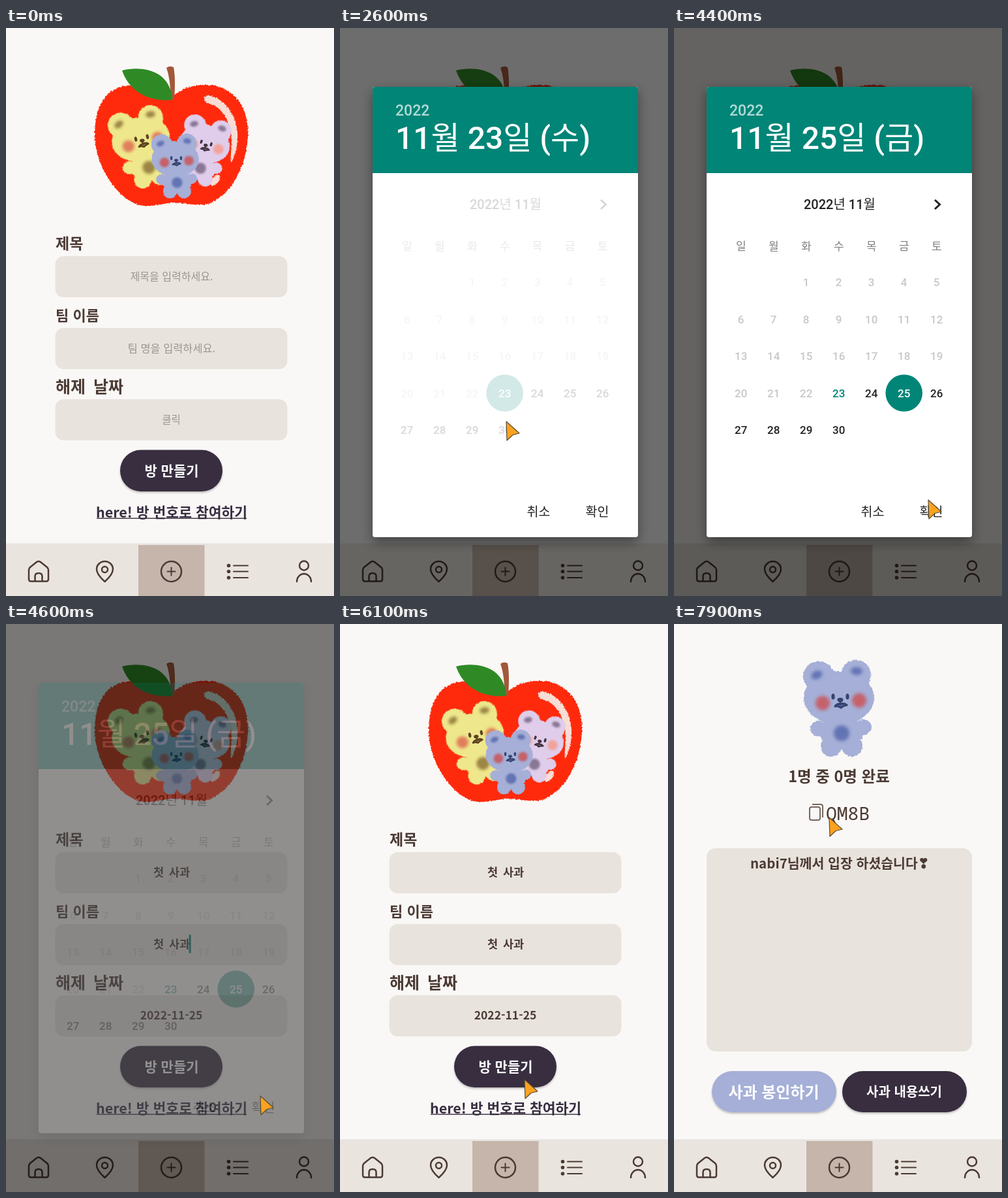
These frames come from a looping animation (503 px wide and 869 px high, 8 s). An HTML page:

```html
<!DOCTYPE html>
<html lang="ko">
<head>
<meta charset="utf-8">
<style>
html, body { margin: 0; height: 100%; overflow: hidden; background: #faf8f6; }
svg { display: block; width: 100vw; height: 100vh; }
text { text-anchor: middle; white-space: pre; font-family: "Noto Sans CJK KR", "Noto Sans CJK", "Noto Sans CJK JP", sans-serif; }
.start { text-anchor: start; }
.b { font-weight: 700; }
.m { font-weight: 500; }
.cal text { font-family: Roboto, "Noto Sans CJK KR", "Noto Sans CJK", "Noto Sans CJK JP", sans-serif; }
.mono { font-family: "Noto Sans Mono", monospace; }
</style>
</head>
<body>
<script>
const INK = '#4b3a34', FIELD = '#e9e3dd', DARK = '#382e41', TEAL = '#008577', HINT = '#9b9591', BLUE = '#a5afd7';

const rect = (x, y, w, h, r, fill, more = '') =>
  `<rect x="${x}" y="${y}" width="${w}" height="${h}" rx="${r}" fill="${fill}" ${more}/>`;
const oval = (x, y, rx, ry, fill = '', turn = 0) =>
  `<ellipse rx="${rx}" ry="${ry}" transform="translate(${x} ${y}) rotate(${turn})" ${fill && `fill="${fill}"`}/>`;
const path = (d, fill, more = '') => `<path d="${d}" fill="${fill}" ${more}/>`;
// y is the visual middle of the line
const text = (x, y, str, size, fill, more = '') =>
  `<text x="${x}" y="${y + size * .36}" font-size="${size}" fill="${fill}" ${more}>${str}</text>`;
const bold = 'class="b"', medium = 'class="m"', label = 'class="b start"';

// Bear around its nose
const bear = (x, y, scale, turn, coat, spot, cheek, face) => `
  <g transform="translate(${x} ${y}) rotate(${turn}) scale(${scale})">
    <g fill="${coat}" filter="url(#rough)">
      ${oval(-33, -37, 24, 23)}${oval(24, -39, 23, 23)}${oval(-2, -4, 54, 41)}
      ${oval(2, 49, 33, 26)}${oval(-33, 43, 13, 12)}${oval(35, 41, 13, 12)}
      ${oval(-14, 70, 16, 16)}${oval(18, 70, 16, 16)}
    </g>
    <g filter="url(#soft)">
      ${oval(-36, -39, 9, 6, spot, -25)}${oval(25, -45, 9, 6, spot, 5)}${oval(2, 50, 12, 12, spot)}
      ${oval(-27, 4, 11, 11, cheek)}${oval(29, 0, 11, 11, cheek)}
    </g>
    ${oval(-11, -6, 2.6, 4.6, face)}${oval(11, -6, 2.6, 4.6, face)}${oval(0, -1, 4.5, 3.2, face)}
    ${path('M0 0V5M-8 9Q-4 4 0 6Q5 3 10 7Q4 8 1 11Q-3 8 -8 9Z', spot, `stroke="${face}" stroke-width="3.2" stroke-linejoin="round"`)}
  </g>`;
const blueBear = (x, y, scale) => bear(x, y, scale, 0, BLUE, '#6374b4', '#c4626c', '#35436f');

const apple = `
  <g filter="url(#rough)">
    ${path('M254 106C235 88 205 86 185 88C150 92 136 125 136 165C137 210 170 262 205 271C225 275 240 268 257 267C275 268 290 272 305 270C345 262 373 205 371 155C369 115 345 88 308 87C285 86 265 95 254 106Z', '#ff2a0c')}
    ${path('M305 105C318 98 352 120 355 160C356 182 350 200 345 206C343 200 349 175 343 152C338 133 326 119 312 116C304 113 302 108 305 105Z', '#f8ddd5')}
    ${oval(321, 233, 5, 10, '#f8ddd5', 40)}
  </g>
  ${path('M246 61Q251 57 257 60C260 75 259 95 258 109L252 109C253 90 250 72 246 61Z', '#a2583a')}
  ${path('M178 65C205 58 252 62 255 110C222 113 190 100 178 65Z', '#2f8a26')}
  ${bear(209, 173, .83, -12, '#eee78c', '#9c8644', '#e0805a', '#5b431f')}
  ${bear(306, 180, .71, 15, '#e0cdeb', '#8a7695', '#f2a39b', '#43333f')}
  ${blueBear(261, 203, .67)}`;

const form = `
  ${apple}
  ${text(76, 330, '제목', 23, INK, label)}
  ${text(76, 440, '팀 이름', 22, INK, label)}
  ${text(76, 549, '해제 날짜', 25, INK, label + ' word-spacing="5"')}
  ${[349, 459, 568].map(y => rect(75.5, y, 356, 63, 13, FIELD)).join('')}
  ${text(254, 380, '', 17, INK, 'id="title"')}
  ${text(254, 490, '', 17, INK, 'id="team"')}
  ${text(253.5, 599, '', 17, INK, 'id="date"')}
  ${rect(0, 0, 3, 28, 0, TEAL, 'id="caret"')}
  ${rect(175, 645.5, 157, 63.5, 31.7, DARK, 'filter="url(#lift)"')}
  ${text(254, 677, '방 만들기', 21, '#fff', bold)}
  ${text(254, 741, 'here! 방 번호로 참여하기', 21.5, DARK, bold)}
  ${rect(139, 749.5, 230, 1.4, 0, DARK)}`;

const room = `
  ${blueBear(255, 117, 1)}
  ${text(253, 234, '1명 중 0명 완료', 23.5, INK, bold)}
  <g fill="none" stroke="#75675f" stroke-width="2"><rect x="208" y="280" width="16" height="20" rx="3"/><path d="M212 276H225Q228 276 228 279V296"/></g>
  ${text(266.5, 290, 'QM8B', 28, INK, 'class="mono"')}
  ${rect(50, 343, 407, 311, 14, FIELD)}
  <g id="joined">${text(254, 367, 'nabi7님께서 입장 하셨습니다❣', 20.5, INK, bold)}</g>
  ${rect(58, 684, 191, 63, 31.5, BLUE, 'filter="url(#lift)"')}
  ${rect(258, 684, 191, 63, 31.5, DARK, 'filter="url(#lift)"')}
  ${text(153, 716, '사과 봉인하기', 24, '#fff', bold)}
  ${text(353, 716, '사과 내용쓰기', 20, '#fff', bold)}`;

const nav = `
  ${rect(0, 790.5, 503, 79, 0, '#eae4de', 'filter="url(#edge)"')}
  ${rect(203, 791, 101.5, 78, 0, '#c5b5ab')}
  <g fill="none" stroke="${INK}" stroke-width="2.5" stroke-linejoin="round" stroke-linecap="round">
    <path d="M35 829Q35 827 37 825L47 817Q50 815 53 817L63 825Q65 827 65 829V843Q65 846.5 62 846.5H38Q35 846.5 35 843ZM44.5 846V839Q44.5 834 50 834Q55.5 834 55.5 839V846"/>
    <path d="M151.5 847Q139 836 139 828A12.5 12 0 0 1 164 828Q164 836 151.5 847Z"/><circle cx="151.5" cy="828.5" r="4.5"/>
    <circle cx="253.5" cy="831.5" r="15.5"/><path d="M247.5 831.5H259.5M253.5 825.5V837.5" stroke-width="2"/>
    <path d="M349 822.5H371M349 831.5H371M349 841H371" stroke-width="2"/>
    <circle cx="457" cy="822.5" r="7"/><path d="M446 847A11 12 0 0 1 468 847"/>
  </g>
  ${[822.5, 831.5, 841].map(y => oval(341.5, y, 2.8, 2.8, INK)).join('')}`;

const col = i => 102.7 + 50 * i;
const days = Array.from({ length: 30 }, (_, i) => {
  const d = i + 1, cell = d + 1;
  return text(col(cell % 7), 389 + 56.5 * (cell / 7 | 0), d, 17, d < 23 ? '#c8c8c8' : '#222', `class="m" id="d${d}"`);
}).join('');

const calendar = `
  <g filter="url(#deep)">${rect(50, 90, 407, 689, 4, '#fff')}</g>
  ${path('M50 222V94Q50 90 54 90H453Q457 90 457 94V222Z', TEAL)}
  ${text(85, 126, '2022', 23, '#b2dad6', 'class="m start"')}
  ${text(85, 168, '', 48, '#fff', 'class="m start" id="head"')}
  <g id="month">
    ${text(254, 270, '2022년 11월', 20, '#222', medium)}
    ${path('M400 263L407.5 270L400 277', 'none', 'stroke="#222" stroke-width="3"')}
    ${[...'일월화수목금토'].map((d, i) => text(col(i), 334, d, 17, '#808080')).join('')}
    <circle id="pick" cy="558.5" r="28.3" fill="${TEAL}"/>
    ${days}
  </g>
  ${text(304.5, 740, '취소', 19.5, '#222', medium)}
  ${text(394.5, 740, '확인', 19.5, '#222', medium)}`;

document.body.innerHTML = `
<svg viewBox="0 0 503 869" preserveAspectRatio="none">
  <defs>
    <filter id="rough" color-interpolation-filters="sRGB"><feTurbulence type="fractalNoise" baseFrequency=".4" numOctaves="2" seed="4"/><feDisplacementMap in="SourceGraphic" scale="4" xChannelSelector="R" yChannelSelector="G"/></filter>
    <filter id="soft" x="-20%" y="-20%" width="140%" height="140%" color-interpolation-filters="sRGB"><feGaussianBlur stdDeviation="2.6"/></filter>
    <filter id="lift" x="-10%" y="-20%" width="120%" height="150%"><feDropShadow dx="0" dy="2" stdDeviation="1.4" flood-opacity=".25"/></filter>
    <filter id="edge" y="-10%" height="120%"><feDropShadow dx="0" dy="-1" stdDeviation="1" flood-opacity=".18"/></filter>
    <filter id="deep"><feDropShadow dx="0" dy="7" stdDeviation="9" flood-opacity=".4"/></filter>
  </defs>
  ${rect(0, 0, 503, 869, 0, '#faf8f6')}
  <g id="form">${form}</g>
  <g id="room">${room}</g>
  ${nav}
  ${rect(0, 0, 503, 869, 0, '#000', 'id="dim"')}
  <g id="dialog" class="cal">${calendar}</g>
  <path id="cursor" d="M0 0L20 18L10 20.5L1 29Z" fill="#fba31f" stroke="#5b4a33" stroke-width="1.2" stroke-linejoin="round"/>
</svg>`;

const $ = id => document.getElementById(id);
const set = (id, name, value) => $(id).setAttribute(name, value);
const show = (id, on) => set(id, 'display', on ? 'inline' : 'none');
const ramp = (t, a, b) => Math.min(1, Math.max(0, (t - a) / (b - a)));

const strokes = ['', 'ㅊ', '처', '첫', '첫 ', '첫 ㅅ', '첫 사', '첫 삭', '첫 사고', '첫 사과'];
const typed = (t, a, b) => strokes[Math.floor(ramp(t, a, b) * (strokes.length - 1))];

// time, x, y
const route = [
  [300, 330, 440], [600, 262, 384], [1400, 262, 384], [1600, 263, 487], [2000, 263, 487],
  [2300, 255, 602], [2800, 255, 602], [3400, 354, 566], [3700, 354, 566], [4400, 390, 722],
  [4700, 390, 722], [5400, 270, 719], [5800, 283, 697], [7000, 283, 697], [7500, 238, 296]
];
function pointer(t) {
  const i = route.findIndex(p => p[0] > t);
  if (i < 0) return route.at(-1).slice(1);
  const [a, b] = [route[Math.max(0, i - 1)], route[i]];
  const k = ramp(t, a[0], b[0]), e = k * k * (3 - 2 * k);
  return [a[1] + (b[1] - a[1]) * e, a[2] + (b[2] - a[2]) * e];
}

function fill(id, value, hint, size) {
  $(id).textContent = value || hint;
  set(id, 'fill', value ? INK : HINT);
  set(id, 'font-size', value ? 17.5 : size);
  set(id, 'font-weight', value ? 700 : 400);
  set(id, 'word-spacing', value ? 3 : 0);
}

function render(t) {
  const inRoom = t >= 6400;
  show('form', !inRoom);
  show('room', inRoom);
  show('joined', t >= 6700);

  const title = typed(t, 700, 1350), team = typed(t, 1650, 2150);
  fill('title', title, '제목을 입력하세요.', 16);
  fill('team', team, '팀 명을 입력하세요.', 16.4);
  fill('date', t >= 4500 ? '2022-11-25' : '', '클릭', 15.5);

  const first = t < 1550, value = first ? title : team;
  const width = value ? $(first ? 'title' : 'team').getComputedTextLength() : 0;
  set('caret', 'x', 252.5 + width / 2);
  set('caret', 'y', first ? 366 : 475.5);
  show('caret', t >= 600 && (t < 2300 || Math.floor((t - 4600) / 500) % 2 === 0));

  set('dim', 'opacity', .6 * ramp(t, 2350, 2620) * (1 - ramp(t, 4540, 4960)));
  const seen = ramp(t, 2380, 2560) * (1 - ramp(t, 4500, 4622));
  show('dialog', seen > 0);
  set('dialog', 'opacity', seen);
  set('month', 'opacity', ramp(t, 2540, 2890));

  const late = t >= 3700;
  $('head').textContent = late ? '11월 25일 (금)' : '11월 23일 (수)';
  set('pick', 'cx', col(late ? 5 : 3));
  set('d23', 'fill', late ? TEAL : '#fff');
  set('d25', 'fill', late ? '#fff' : '#222');

  show('cursor', t >= 300);
  set('cursor', 'transform', `translate(${pointer(t)})`);
}

function tick() {
  render(performance.now() % 8000);
  requestAnimationFrame(tick);
}
tick();
</script>
</body>
</html>
```
